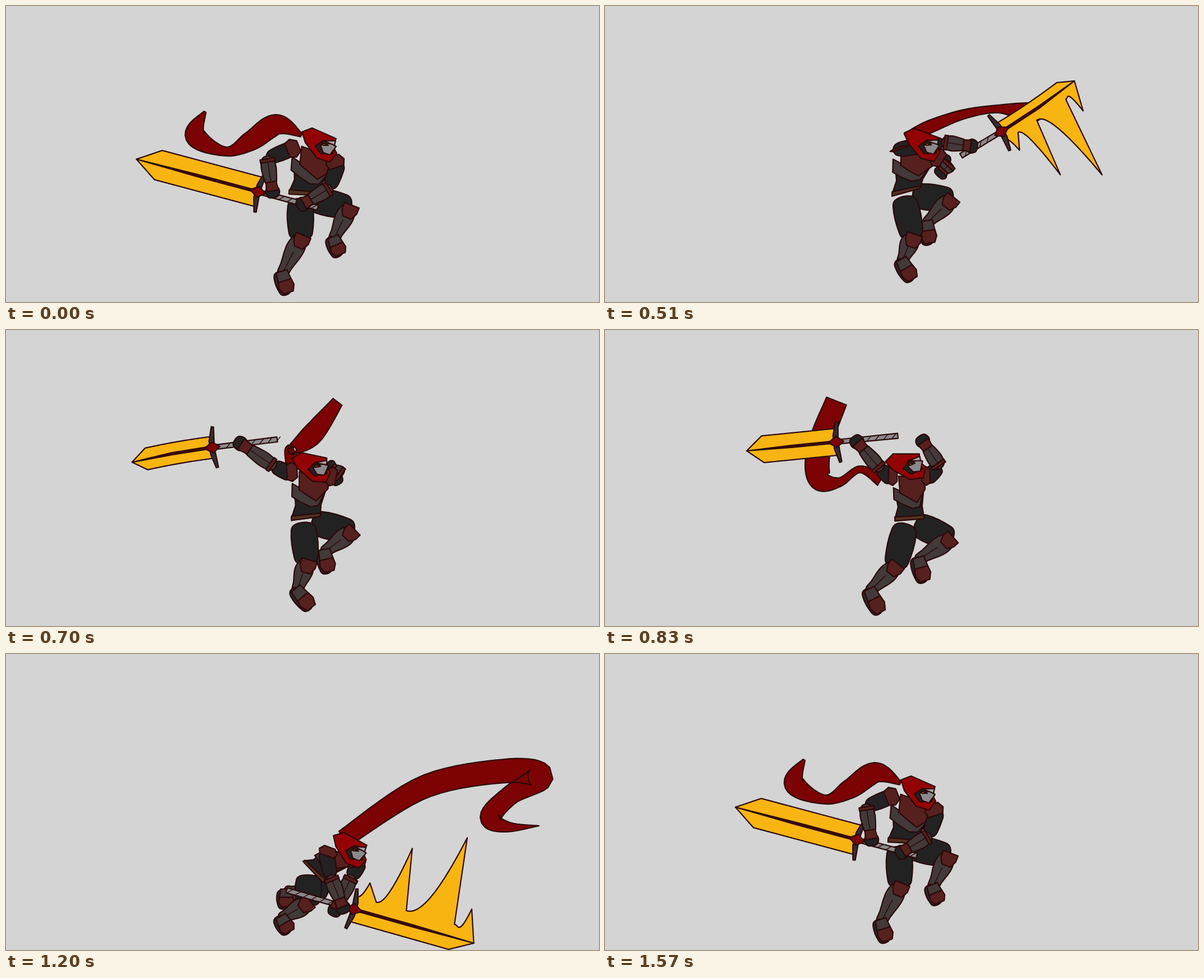
Animation of 1058 by 529 pixels, one loop 1640 ms. Source, as an HTML page with a canvas:

```html
<!DOCTYPE html>
<html lang="en">
<head>
<meta charset="utf-8">
<title>Sword combo</title>
<style>
  html, body { margin: 0; width: 100%; height: 100%; overflow: hidden; background: #d4d4d4; }
  canvas { display: block; }
</style>
</head>
<body>
<canvas id="stage" width="1058" height="529"></canvas>
<script>
const ctx = document.getElementById('stage').getContext('2d');
const INK = '#222223', MAROON = '#56201f', IRON = '#423939', SCARF = '#7c0204', RED = '#930305';
const GOLD = '#f8b411', STEEL = '#8b898c', BELT = '#533020', GUARD = '#332f31', SOLE = '#2b2728';

// Key poses. A is the left side of the picture, B the right; angles in degrees, unwound over the loop.
// beats: how long the pose and each step towards the next one stay, in ms.
// scarf: centre line from the neck, as x, y and half width.
const poses = [
  {
    beats: [200, 70, 70], head: [558, 248], look: 0, hips: [531, 334], tilt: 4,
    shoulderA: [512, 254], elbowA: [466, 273], handA: [476, 334],
    shoulderB: [594, 278], elbowB: [577, 326], handB: [528, 355],
    kneeA: [526, 414], ankleA: [493, 478], toeA: [504, 512],
    kneeB: [612, 360], ankleB: [585, 416], toeB: [597, 444],
    gem: [450, 332], angle: 195, length: 225, width: 27, grip: 110, bend: 0, flare: 0,
    scarf: [[527, 231, 3], [483, 212, 18], [437, 241, 17], [392, 260, 8], [338, 232, 18], [355, 189, 2]]
  },
  {
    beats: [70, 30, 70, 30, 70], head: [585, 248], look: -8, hips: [553, 328], tilt: -21, back: true,
    shoulderA: [524, 270], elbowA: [535, 295], handA: [550, 285],
    shoulderB: [602, 280], elbowB: [638, 291], handB: [612, 303],
    kneeA: [538, 418], ankleA: [477, 444], toeA: [476, 488],
    kneeB: [616, 344], ankleB: [571, 396], toeB: [576, 436],
    gem: [512, 244], angle: -155, length: 201, width: 20, grip: 25, bend: 0, flare: 0,
    scarf: [[548, 252, 6], [605, 268, 7], [690, 246, 13], [785, 223, 16], [838, 233, 18], [815, 280, 1]]
  },
  {
    beats: [30, 30, 30, 30, 70, 30], head: [552, 248], look: 0, hips: [527, 331], tilt: -9,
    shoulderA: [508, 250], elbowA: [462, 238], handA: [384, 206],
    shoulderB: [586, 268], elbowB: [600, 275], handB: [592, 294],
    kneeA: [555, 408], ankleA: [566, 464], toeA: [598, 488],
    kneeB: [618, 347], ankleB: [577, 382], toeB: [582, 415],
    gem: [325, 222], angle: -548.5, length: 131, width: 15, grip: 122, bend: -17, flare: 0,
    scarf: [[531, 226, 11], [560, 182, 14], [605, 159, 5], [645, 158, 1], [712, 162, 16], [770, 130, 1]]
  },
  {
    beats: [70, 70, 70], head: [537, 244], look: -24, hips: [543, 336], tilt: -4,
    shoulderA: [514, 268], elbowA: [490, 247], handA: [448, 198],
    shoulderB: [572, 268], elbowB: [597, 243], handB: [566, 197],
    kneeA: [518, 422], ankleA: [473, 466], toeA: [492, 504],
    kneeB: [616, 374], ankleB: [560, 410], toeB: [571, 448],
    gem: [413, 200], angle: -545.7, length: 161, width: 24, grip: 110, bend: 0, flare: 0,
    scarf: [[492, 268, 11], [455, 249, 6], [418, 272, 8], [383, 266, 20], [382, 210, 21], [413, 127, 19]]
  },
  {
    beats: [100, 30, 30], head: [492, 238], look: -28, hips: [525, 321], tilt: -11,
    shoulderA: [476, 280], elbowA: [452, 243], handA: [394, 272],
    shoulderB: [538, 258], elbowB: [485, 221], handB: [416, 234],
    kneeA: [487, 411], ankleA: [428, 456], toeA: [430, 498],
    kneeB: [542, 412], ankleB: [482, 362], toeB: [452, 374],
    gem: [390, 298], angle: -606.7, length: 218, width: 26, grip: 120, bend: 0, flare: 0,
    scarf: [[447, 285, 9], [431, 335, 6], [415, 382, 10], [378, 398, 3], [340, 360, 14], [350, 312, 8]]
  },
  {
    beats: [30, 70, 70, 70, 60, 70], head: [612, 350], look: 5, hips: [550, 388], tilt: 45,
    shoulderA: [570, 350], elbowA: [580, 400], handA: [602, 455],
    shoulderB: [632, 370], elbowB: [616, 400], handB: [586, 460],
    kneeA: [538, 446], ankleA: [492, 472], toeA: [506, 496],
    kneeB: [550, 432], ankleB: [500, 424], toeB: [500, 452],
    gem: [620, 456], angle: -344.2, length: 223, width: 23, grip: 124, bend: 0, flare: 1,
    scarf: [[603, 330, 16], [745, 238, 20], [890, 209, 21], [953, 219, 23], [900, 252, 17],
      [864, 292, 18], [895, 309, 9], [951, 307, 0]]
  }
];
poses.push({ ...poses[0], beats: [70], angle: -165 });

const lerp = (a, b, k) => a + (b - a) * k;
const along = (a, b, k) => [lerp(a[0], b[0], k), lerp(a[1], b[1], k)];
const shift = (p, x, y) => [p[0] + x, p[1] + y];
const toward = (a, b, px) => along(a, b, px / (Math.hypot(b[0] - a[0], b[1] - a[1]) || 1));
const rad = degrees => degrees * Math.PI / 180;
const spin = ([x, y], degrees) => {
  const c = Math.cos(rad(degrees)), s = Math.sin(rad(degrees));
  return [x * c - y * s, x * s + y * c];
};

// Catmull-Rom curve through key points, evenly sampled.
function curve(keys, count = 60) {
  const last = keys.length - 1;
  return Array.from({ length: count + 1 }, (_, i) => {
    const at = i / count * last, n = Math.min(Math.floor(at), last - 1), t = at - n;
    const [a, b, c, d] = [-1, 0, 1, 2].map(o => keys[Math.max(0, Math.min(last, n + o))]);
    return b.map((v, j) => v + t / 2 * (c[j] - a[j] + t * (2 * a[j] - 5 * v + 4 * c[j] - d[j]
      + t * (3 * (v - c[j]) + d[j] - a[j]))));
  });
}

// The sword and the arm that leads it turn about the point between the shoulders.
const SWINGING = ['elbowA', 'handA', 'gem'];
const centre = pose => along(pose.shoulderA, pose.shoulderB, .5);
for (const pose of poses) {
  const [x, y] = centre(pose);
  for (const key of SWINGING) pose[key] = spin(shift(pose[key], -x, -y), -pose.angle);
}
poses.forEach((pose, i) => { if (i < poses.length - 1) pose.scarf = curve(pose.scarf); });
poses[poses.length - 1] = { ...poses[0], beats: [70], angle: -165 };

function mix(a, b, k) {
  if (typeof a === 'number') return lerp(a, b, k);
  if (Array.isArray(a)) return a.map((v, i) => mix(v, b[i], k));
  return Object.fromEntries(Object.keys(a).filter(key => key !== 'beats' && key !== 'back')
    .map(key => [key, mix(a[key], b[key], k)]));
}

function poseAt(i, k) {
  const from = poses[i], to = poses[i + 1] || from;
  const pose = mix(from, to, k), swing = to.angle - from.angle;
  pose.back = (k < .5 ? from : to).back;
  pose.side = Math.sign(swing) || 1;
  if (Math.abs(swing) > 300) pose.flare += Math.sin(Math.PI * k);
  const [x, y] = centre(pose);
  for (const key of SWINGING) pose[key] = shift(spin(pose[key], pose.angle), x, y);
  return pose;
}

function shape(points, color, round) {
  ctx.beginPath();
  points.forEach((p, i) => {
    const next = points[(i + 1) % points.length], mid = along(p, next, .5);
    if (!round) return ctx.lineTo(...p);
    if (!i) ctx.moveTo(...along(points[points.length - 1], p, .5));
    ctx.quadraticCurveTo(...p, ...mid);
  });
  ctx.closePath();
  ctx.fillStyle = color;
  ctx.fill();
  ctx.lineWidth = 2.2;
  ctx.stroke();
}

function line(a, b) {
  ctx.beginPath();
  ctx.moveTo(...a);
  ctx.lineTo(...b);
  ctx.lineWidth = 1.4;
  ctx.stroke();
}

// Outline around the bone a-b with evenly spaced half widths.
function bone(a, b, widths, color, round) {
  const turn = Math.atan2(b[1] - a[1], b[0] - a[0]) * 180 / Math.PI;
  const edge = sign => widths.map((w, i) => {
    const [x, y] = spin([0, sign * w], turn);
    return shift(along(a, b, i / (widths.length - 1)), x, y);
  });
  shape([...edge(-1), ...edge(1).reverse()], color, round);
}

function drawScarf({ scarf }) {
  const edge = sign => scarf.map(([x, y, w], i) => {
    const a = scarf[Math.max(0, i - 1)], b = scarf[Math.min(scarf.length - 1, i + 1)];
    const dx = b[0] - a[0], dy = b[1] - a[1], d = Math.hypot(dx, dy) || 1;
    return [x - sign * w * dy / d, y + sign * w * dx / d];
  });
  shape([...edge(1), ...edge(-1).reverse()], SCARF);
}

// Torn edge the blade leaves behind in a swing: slow rise to each peak, sharp drop after it.
const SPIKES = [[0, .07, 30], [.16, .32, 110], [.41, .72, 155], [.84, .91, 46]];
const DROP = .09;
const spike = u => SPIKES.reduce((sum, [start, peak, height]) => {
  if (u < start || u > peak + DROP) return sum;
  return sum + height * (u < peak ? ((u - start) / (peak - start)) ** 2.2 : 1 - (u - peak) / DROP);
}, 0);

function drawSword({ gem, angle, length, width, grip, bend, flare, side }) {
  const place = (x, y) => [x, y + bend * (x / length) ** 2];
  const edge = (sign, torn) => Array.from({ length: 101 }, (_, i) => {
    const u = i / 100, body = width * Math.min(1, (1 - u) / .18);
    return place(u * length, sign * (body + torn * spike(u)));
  });
  ctx.save();
  ctx.translate(...gem);
  ctx.rotate(rad(angle));
  shape([[-8, -4], [-grip, -4.5], [-grip, 4.5], [-8, 4]], STEEL);
  for (let x = 24; x < grip; x += 15) line([-x, -4], [-x - 8, 4]);
  shape([...edge(-side, flare), ...edge(side, 0).reverse()], GOLD);
  shape([place(8, -2), place(length / 2, -2), place(length, 0), place(length / 2, 2), place(8, 2)], '#4a0808');
  shape([[-6, -36], [-2, -37], [5, -12], [5, 12], [-2, 37], [-6, 36], [-3, 0]], GUARD);
  shape([[-13, 0], [0, -10], [15, 0], [0, 10]], SCARF);
  ctx.restore();
}

function drawArm(pose, side) {
  const shoulder = pose['shoulder' + side], elbow = pose['elbow' + side], hand = pose['hand' + side];
  const tip = toward(hand, elbow, -9);
  bone(shoulder, elbow, [13, 14, 11], INK, true);
  bone(along(elbow, hand, .82), tip, [9, 13, 12, 8], INK, true);
  bone(along(elbow, hand, -.08), along(elbow, hand, .8), [9, 14, 12, 9], IRON, true);
  line(along(elbow, hand, .1), along(elbow, hand, .65));
  bone(elbow, toward(elbow, hand, 6), [13, 13], MAROON);
  bone(along(elbow, hand, .68), along(elbow, hand, .94), [9, 11], MAROON);
  const inner = along(shoulder, centre(pose), .25);
  bone(shift(inner, 0, -7), toward(shoulder, elbow, 11), [10, 17, 13], MAROON);
}

function drawLeg(pose, side) {
  const knee = pose['knee' + side], ankle = pose['ankle' + side], toe = pose['toe' + side];
  const [x, y] = spin([side === 'A' ? -6 : 10, 10], pose.tilt / 2);
  const hip = shift(pose.hips, x, y);
  bone(hip, toward(knee, hip, -4), [20, 24, 23, 19], INK, true);
  bone(along(knee, ankle, -.05), along(knee, ankle, 1.08), [11, 17, 15, 10, 10], IRON, true);
  line(along(knee, ankle, .4), along(knee, ankle, .9));
  bone(shift(knee, 5, -4), shift(toward(knee, ankle, 20), 5, 0), [14, 14, 8], MAROON);
  bone(shift(toward(ankle, toe, -4), -7, 1), shift(toe, -3, 4), [8, 12, 12, 9], SOLE, true);
  bone(toward(ankle, toe, -4), along(ankle, toe, .6), [10, 13], IRON);
  bone(along(ankle, toe, .38), toe, [12, 14, 9], MAROON);
}

function drawTorso({ shoulderA, shoulderB, hips, tilt, back }) {
  const [wx, wy] = spin([26, 0], tilt);
  // u runs from side to side, v from the shoulders down to the belt.
  const plate = (color, points, round) => shape(points.map(([u, v]) =>
    along(along(shoulderA, shoulderB, (u + 1) / 2), shift(hips, u * wx, u * wy), v)), color, round);
  plate(INK, [[-.9, .3], [.9, .3], [.85, .7], [1, 1], [-1, 1], [-.75, .7]]);
  plate(BELT, [[-1, .95], [1, .95], [1, 1.05], [-1, 1.05]]);
  if (back) {
    plate(IRON, [[0, .3], [.9, .3], [.8, .65], [0, .7]]);
    plate(MAROON, [[-1.3, .62], [-1.3, .05], [-.9, -.35], [.3, -.4], [.6, .1], [.3, .62]], true);
    return;
  }
  plate(IRON, [[-1, .2], [0, .4], [.9, .3], [.7, .72], [.2, .75], [-.5, .62], [-1, .5]]);
  plate(MAROON, [[-.65, -.1], [.9, -.05], [1, .25], [.5, .6], [0, .48], [-.6, .33]]);
}

function drawHead({ head, look, back }) {
  const part = (color, points) => shape(points.map(p => shift(spin(p, look), ...head)), color);
  part(RED, [[-30, -23], [-12, -30], [31, -11], [25, 2], [32, 15], [20, 31], [-3, 24], [-24, -4]]);
  if (back) return;
  part(INK, [[9, -8], [-6, 2], [3, 16], [25, 16], [27, -5]]);
  part(STEEL, [[3, 1], [22, -3], [31, 3], [20, 18], [8, 14]]);
  part('#a5a3a6', [[9, -7], [30, -7], [28, 1]]);
  part('#f0a818', [[5, -4], [17, 1], [8, 1]]);
}

const legA = pose => drawLeg(pose, 'A'), legB = pose => drawLeg(pose, 'B');
const armA = pose => drawArm(pose, 'A'), armB = pose => drawArm(pose, 'B');
const FRONT = [drawScarf, legB, legA, drawTorso, drawSword, armB, armA, drawHead];
const BACK = [drawSword, armA, legA, legB, armB, drawTorso, drawHead, drawScarf];

function draw(pose) {
  ctx.fillStyle = '#d4d4d4';
  ctx.fillRect(0, 0, 1058, 529);
  ctx.strokeStyle = '#2b0808';
  ctx.lineJoin = ctx.lineCap = 'round';
  for (const layer of pose.back ? BACK : FRONT) layer(pose);
}

let clock = 0;
const steps = poses.flatMap(({ beats }, i) => beats.map((ms, j) => {
  const start = clock;
  clock += ms;
  return { start, pose: poseAt(i, j / beats.length) };
}));

function tick() {
  const t = performance.now() % clock;
  draw(steps.findLast(step => step.start <= t).pose);
  requestAnimationFrame(tick);
}
tick();
</script>
</body>
</html>
```
